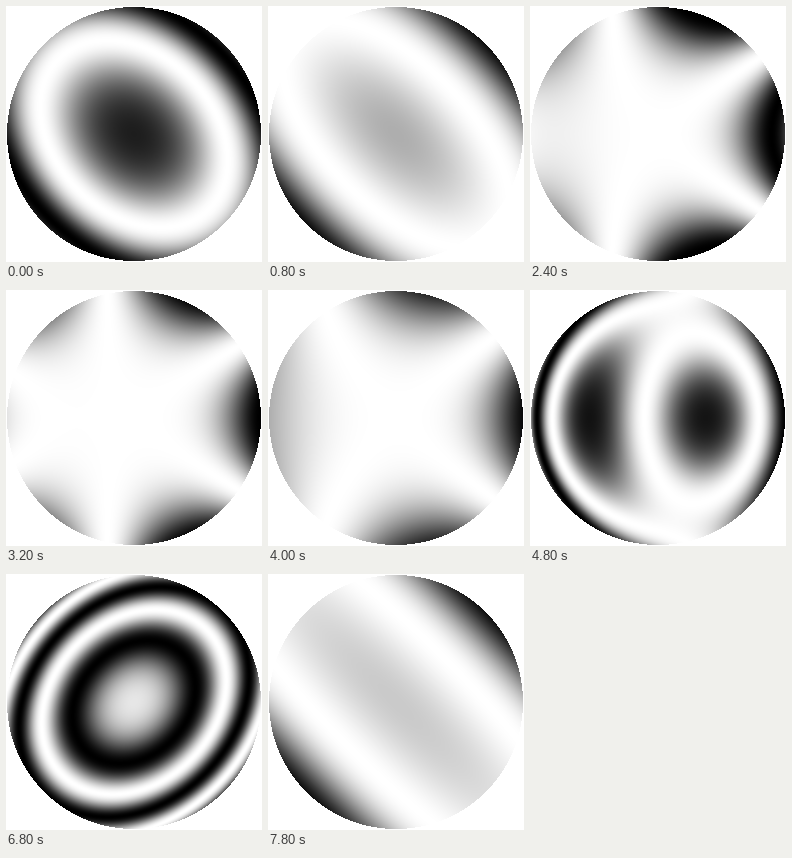
An HTML page with a canvas that plays this animation: 256 by 256 pixels, repeating every 8000 ms.

```html
<!DOCTYPE html>
<html lang="en">
<head>
<meta charset="utf-8">
<title>Zernike interferogram</title>
<style>
  html, body { margin: 0; height: 100%; overflow: hidden; background: #fff; }
  canvas { display: block; width: 100vw; height: 100vh; }
</style>
</head>
<body>
<canvas id="stage" width="256" height="256"></canvas>
<script>
const SIZE = 256, RADIUS = 127, LOOP = 8000, STEP = 200;

// Zernike modes in pupil coordinates (y up, r2 = x² + y²)
const defocus = (x, y, r2) => 2 * r2 - 1;
const astigOblique = (x, y) => 2 * x * y;
const astigVertical = (x, y) => x * x - y * y;
const trefoil = (x, y) => x * (x * x - 3 * y * y);
const coma = (x, y, r2) => x * (3 * r2 - 2);
const spherical = (x, y, r2) => 6 * r2 * r2 - 6 * r2 + 1;

// Each act mixes two modes; keys are [ms, first weight, second weight] in radians
const acts = [
  { end: 1800, modes: [defocus, astigOblique],
    keys: [[0, 2.45, 1.4], [600, 0.95, 1.7], [1600, 2.2, 0.6]] },
  { end: 4200, modes: [astigVertical, trefoil],
    keys: [[1800, 3, 1.8], [3200, 1.27, 1.95], [4000, 2, 0.8]] },
  { end: 6600, modes: [coma, spherical],
    keys: [[4200, 3.6, -0.6], [5800, 4.5, -1.35], [6400, 4, -1.5]] },
  { end: LOOP, modes: [defocus, astigOblique],
    keys: [[6600, 6.2, -3], [6800, 5.65, -2.6], [7200, 2.8, 0.6], [7800, 0.95, 1.7]] },
];

const ctx = document.getElementById('stage').getContext('2d');
const image = ctx.createImageData(SIZE, SIZE);
const pixels = new Uint32Array(image.data.buffer).fill(0xffffffff);

function weightsAt(keys, time) {
  const next = keys.findIndex(key => key[0] > time);
  if (next < 0) return keys[keys.length - 1].slice(1);
  const from = keys[next - 1], to = keys[next];
  const part = (time - from[0]) / (to[0] - from[0]);
  return [1, 2].map(i => from[i] + (to[i] - from[i]) * part);
}

function draw(time) {
  const { modes: [first, second], keys } = acts.find(act => time < act.end);
  const [a, b] = weightsAt(keys, time);
  for (let row = 0; row < SIZE; row++) {
    const y = (SIZE / 2 - row - 0.5) / RADIUS;
    for (let col = 0; col < SIZE; col++) {
      const x = (col + 0.5 - SIZE / 2) / RADIUS;
      const r2 = x * x + y * y;
      if (r2 > 1) continue;
      const phase = a * first(x, y, r2) + b * second(x, y, r2);
      const gray = Math.round(127.5 * (1 + Math.cos(phase)));
      pixels[row * SIZE + col] = 0xff000000 | gray * 0x010101;
    }
  }
  ctx.putImageData(image, 0, 0);
}

const start = performance.now();
let shown = -1;
function tick() {
  const elapsed = (performance.now() - start) % LOOP;
  const time = Math.floor(elapsed / STEP) * STEP;
  if (time !== shown) draw(shown = time);
  requestAnimationFrame(tick);
}
tick();
</script>
</body>
</html>
```
